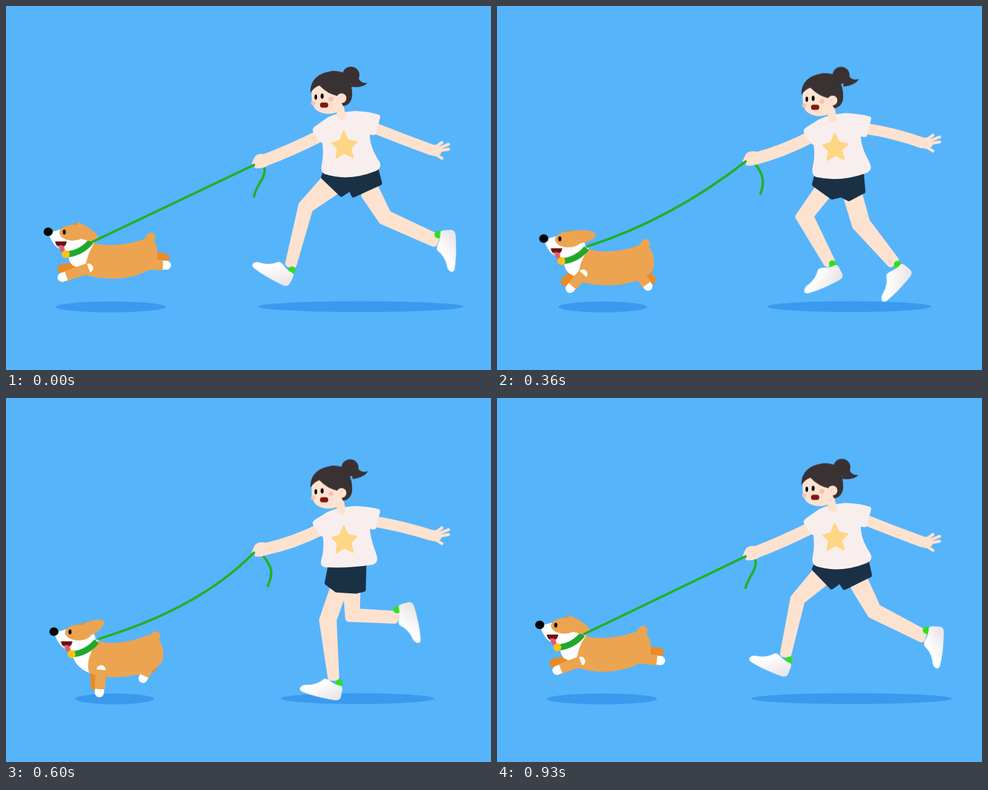
These frames come from a looping animation (800 px wide and 600 px high, 960 ms). An HTML page without scripts:

```html
<!DOCTYPE html>
<html lang="en">
<head>
<meta charset="utf-8">
<title>Dog run</title>
<style>
html, body { margin: 0; width: 100%; height: 100%; overflow: hidden; background: #56b4fb; }
svg { display: block; width: 100vw; height: 100vh; }
svg * { animation: 960ms linear infinite; }
.skin { fill: #fee2d0; }
.limb { fill: none; stroke: #fee2d0; }
.leg { fill: #fee2d0; stroke: #fee2d0; stroke-width: 12; stroke-linejoin: round; }
.hair { fill: #3a3133; }
.coat { fill: #eda450; }
.rope { fill: none; stroke: #22b024; stroke-width: 4; stroke-linecap: round; }
.dark { fill: none; stroke: #e88b28; stroke-width: 15; stroke-linecap: round; }
.paw { fill: none; stroke: #fff; stroke-width: 15; stroke-linecap: round; }
.fur { fill: none; stroke: #eda450; stroke-width: 17; stroke-dasharray: 84 100; }

/* The resting pose opens and closes every loop; keyframes hold the poses between. */
.dog-shade { animation-name: dog-shade; }
@keyframes dog-shade {
  12.5% { cx: 178px; rx: 70px; }
  25% { cx: 176px; rx: 48px; }
  46.88%, 48.4%, 96.88% { cx: 173px; rx: 91px; }
  62.5% { cx: 179px; rx: 65px; }
  75% { cx: 176px; rx: 54px; }
}
.girl-shade { animation-name: girl-shade; }
@keyframes girl-shade {
  12.5% { cx: 580.5px; rx: 131.5px; }
  25% { cx: 576px; rx: 94px; }
  46.88%, 96.88% { cx: 585px; rx: 165px; }
  48.4%, 98.4% { cx: 585.5px; rx: 169.5px; }
  62.5% { cx: 580px; rx: 127px; }
  73.4% { cx: 576px; rx: 94px; }
}

.head { animation-name: head; }
@keyframes head {
  12.5% { transform: translate(8.5px, 11.5px); }
  25% { transform: translate(16.5px, 24px); }
  46.88%, 48.4%, 96.88% { transform: translate(1px, 2px); }
  62.5% { transform: translate(9.5px, 13px); }
  75% { transform: translate(15.5px, 22px); }
}
.flap { transform: translate(122px, 370px) rotate(30deg); animation-name: flap; }
@keyframes flap {
  12.5% { transform: translate(122px, 370px) rotate(-20deg); }
  25% { transform: translate(122px, 370px) rotate(-48deg); }
  46.88%, 48.4%, 96.88% { transform: translate(122px, 370px) rotate(28deg); }
  62.5% { transform: translate(122px, 370px) rotate(-23deg); }
  75% { transform: translate(122px, 370px) rotate(-45deg); }
}
.back-flap { transform: translate(118px, 370px) rotate(24deg); animation-name: back-flap; }
@keyframes back-flap {
  12.5%, 62.5% { transform: translate(116px, 370px) rotate(-18deg); }
  25%, 75% { transform: translate(113px, 370px) rotate(-44deg); }
  46.88%, 96.88% { transform: translate(118px, 370px) rotate(24deg); }
}
.wag { animation-name: wag; }
@keyframes wag {
  12.5%, 62.5% { transform: translate(8px, 11px); }
  25% { transform: translate(11.5px, 23px); }
  46.88%, 48.4%, 96.88% { transform: translate(2px, 2px); }
  75% { transform: translate(11px, 23px); }
}
.trunk { animation-name: trunk; }
@keyframes trunk {
  12.5%, 62.5% { d: path("M152 400C170 408 210 402 236 390C255 392 263 415 258 432C250 452 215 458 185 460C165 461 150 458 137 453C132 435 140 415 152 400Z"); }
  25%, 75% { d: path("M158 412C180 420 220 418 245 404C265 410 270 435 263 450C250 468 215 475 185 473C165 472 150 470 138 466C138 445 145 425 158 412Z"); }
  46.88%, 48.4%, 96.88% { d: path("M147 392C162 398 202 397 235 383C252 385 256 405 253 425C240 440 202 453 167 451C143 449 134 444 127 445C133 431 132 410 147 392Z"); }
}
.chest { animation-name: chest; }
@keyframes chest {
  12.5%, 62.5% { d: path("M152 398L109 424Q116 446 140 454Z"); }
  25%, 75% { d: path("M157 408L119 432Q118 452 140 466Z"); }
  46.88%, 48.4%, 96.88% { d: path("M147 390L104 411Q104 436 132 433Z"); }
}
.fore { animation-name: fore; }
@keyframes fore {
  12.5% { d: path("M158 448L155 485"); }
  25% { d: path("M147 452L150 488"); }
  46.88%, 48.4%, 96.88% { d: path("M138 434L99 449"); }
  62.5% { d: path("M157 448L154 486"); }
  75% { d: path("M145 452L147 485"); }
}
.far-fore { animation-name: far-fore; }
@keyframes far-fore {
  12.5%, 62.5% { d: path("M147 450L147 474"); }
  25% { d: path("M131 455L138 478"); }
  46.88%, 48.4%, 96.88% { d: path("M124 431L94 437"); }
  75% { d: path("M130 455L136 474"); }
}
.hind { animation-name: hind; }
@keyframes hind {
  12.5% { d: path("M240 430L229 459"); }
  25% { d: path("M243 462L226 497"); }
  46.88%, 48.4% { d: path("M230 430L266 436"); }
  62.5% { d: path("M238 435L226 462"); }
  75% { d: path("M243 460L228 494"); }
  96.88% { d: path("M232 429L270 433"); }
}
.far-hind { animation-name: far-hind; }
@keyframes far-hind {
  12.5%, 62.5% { d: path("M240 430L240 445"); }
  25% { d: path("M246 460L239 490"); }
  46.88%, 48.4% { d: path("M240 421L266 423"); }
  75% { d: path("M244 460L240 486"); }
  96.88% { d: path("M240 416L268 419"); }
}

.leash { animation-name: leash; }
@keyframes leash {
  12.5% { d: path("M153 397Q322 343 409 256"); }
  25% { d: path("M157 406Q302 388 410 250"); }
  46.88%, 48.4%, 96.88% { d: path("M144 389Q277 325 410 261"); }
  62.5% { d: path("M153 397Q320 346 409 255"); }
  75% { d: path("M157 405Q302 386 410 252"); }
}
.loose { animation-name: loose; }
@keyframes loose {
  12.5% { d: path("M426 262C433 285 422 285 417 312"); }
  25% { d: path("M425 259C436 277 434 290 426 311"); }
  46.88%, 48.4% { d: path("M428 264C444 280 446 295 441 308"); }
  62.5% { d: path("M425 261C441 282 440 290 432 310"); }
  75% { d: path("M425 260C436 278 432 290 424 311"); }
  96.88% { d: path("M426 264C430 285 416 290 410 313"); }
}

.bob { animation-name: bob; }
@keyframes bob {
  12.5%, 62.5% { transform: translateY(4.5px); }
  25% { transform: translateY(8px); }
  46.88%, 48.4%, 96.88% { transform: translateY(.5px); }
  75% { transform: translateY(7.8px); }
}
.pony { transform-origin: 555px 118px; animation-name: pony; }
@keyframes pony {
  12.5%, 62.5% { transform: rotate(-15deg); }
  25% { transform: rotate(-33deg); }
  46.88%, 48.4%, 96.88% { transform: rotate(-1deg); }
  75% { transform: rotate(-31deg); }
}
.shirt { animation-name: shirt; }
@keyframes shirt {
  12.5% { d: path("M530 188Q547 180 575 177Q600 178 614 182Q618 183 617 187L610 215Q609 218 600 216Q602 232 613 255Q622 274 606 278Q565 285 526 281Q516 278 521 263Q525 248 523 229Q517 228 506 208Q505 204 509 201Z"); }
  25% { d: path("M530 192Q547 183 575 181Q600 182 614 186Q618 187 617 191L610 219Q609 222 600 219Q602 236 612 258Q622 276 606 281Q565 292 528 289Q517 286 521 270Q526 252 523 233Q517 231 506 210Q505 206 509 203Z"); }
  46.88%, 48.4%, 96.88% { d: path("M530 184Q547 175 575 173Q600 174 614 179Q618 180 617 184L610 211Q609 214 600 212Q600 232 615 255Q622 266 610 272Q565 290 526 277Q518 274 521 260Q524 245 522 226Q517 225 506 206Q505 202 509 199Z"); }
  62.5% { d: path("M530 188Q547 180 575 178Q600 179 614 183Q618 184 617 188L610 215Q609 218 600 216Q602 234 610 255Q617 273 603 275Q565 281 526 279Q516 277 521 263Q525 248 523 229Q517 228 506 208Q505 204 509 201Z"); }
  75% { d: path("M530 192Q547 183 575 181Q600 182 614 186Q618 187 617 191L610 219Q609 222 600 219Q602 240 608 260Q613 277 599 277Q560 278 526 283Q516 281 521 268Q525 252 523 233Q517 231 506 210Q505 206 509 203Z"); }
}
.shorts { animation-name: shorts; }
@keyframes shorts {
  12.5% { d: path("M538 278L533 300L574 319L579 311L583 311L598 307L597 272Z"); }
  25% { d: path("M535 283L531 301L550 318L570 320L588 320L595 319L596 275Z"); }
  46.88%, 48.4% { d: path("M523 270L517 289L555 314L566 306L575 317L611 296L605 268Z"); }
  62.5% { d: path("M535 275L529 305L545 317L560 318L577 319L590 316L591 270Z"); }
  75% { d: path("M530 278L522 299L549 322L560 324L574 326L588 325L594 268Z"); }
  96.88% { d: path("M529 268L523 282L552 312L566 302L573 313L615 292L609 265Z"); }
}
.front-arm { animation-name: front-arm; }
@keyframes front-arm {
  12.5%, 62.5% { d: path("M520 216Q475 239 424 250"); }
  25%, 75% { d: path("M520 217Q476 242 424 248"); }
  46.88%, 48.4%, 96.88% { d: path("M520 213Q470 238 425 255"); }
}
.fist { animation-name: fist; }
@keyframes fist {
  12.5% { transform: translateY(-5px); }
  25%, 75% { transform: translateY(-9px); }
  46.88%, 48.4% { transform: translateY(-1px); }
  62.5% { transform: translateY(-6px); }
  96.88% { transform: none; }
}
.back-arm { animation-name: back-arm; }
@keyframes back-arm {
  12.5% { d: path("M605 203Q655 213 704 232"); }
  25%, 75% { d: path("M605 205Q655 212 704 230"); }
  46.88%, 48.4% { d: path("M605 199Q655 206 704 224"); }
  62.5% { d: path("M605 203Q655 211 704 227"); }
  96.88% { d: path("M605 200Q655 220 704 238"); }
}
.palm { animation-name: palm; }
@keyframes palm {
  12.5% { transform: translateY(-4px); }
  25%, 75% { transform: translateY(-8px); }
  46.88%, 48.4% { transform: translateY(-15px); }
  62.5% { transform: translateY(-11px); }
  96.88% { transform: none; }
}

.leg-a { animation-name: leg-a; }
@keyframes leg-a {
  12.5% { d: path("M540 300L519 353L522 455L531 456L535 357L560 315Z"); }
  25% { d: path("M558 315L560 380L588 460L595 461L578 375L581 315Z"); }
  35.94% { d: path("M575 315L588 365L643 433L651 427L606 358L594 308Z"); }
  46.88%, 48.4% { d: path("M590 315L612 350L684 378L687 370L626 340L606 300Z"); }
  62.5% { d: path("M562 315L566 363L641 366L644 357L578 353L579 315Z"); }
  75% { d: path("M530 308L515 362L597 372L598 365L534 350L544 318Z"); }
  85.94% { d: path("M533 300L500 350L557 425L564 420L519 348L545 312Z"); }
  96.88% { d: path("M527 285L490 330L473 421L480 422L502 334L541 303Z"); }
}
.leg-b { animation-name: leg-b; }
@keyframes leg-b {
  12.5% { d: path("M568 312L573 366L655 384L658 375L589 356L588 305Z"); }
  25% { d: path("M542 310L522 369L607 385L609 376L540 361L548 318Z"); }
  35.94% { d: path("M533 300L500 350L557 425L564 420L519 348L545 312Z"); }
  46.88%, 48.4% { d: path("M524 290L487 333L475 420L482 422L501 337L541 308Z"); }
  62.5% { d: path("M543 305L522 366L536 460L543 460L539 366L556 318Z"); }
  75% { d: path("M559 320L560 379L604 462L611 459L578 374L580 320Z"); }
  85.94% { d: path("M575 315L588 365L643 433L651 427L606 358L594 308Z"); }
  96.88% { d: path("M590 313L617 357L700 397L703 387L627 346L606 300Z"); }
}
.foot-a { transform: translate(471px, 435px) rotate(27deg); animation-name: foot-a; }
@keyframes foot-a {
  12.5% { transform: translate(535px, 463px) rotate(20deg); }
  25% { transform: translate(602px, 467px) rotate(0deg); }
  35.94% { transform: translate(655px, 437px) rotate(-42deg); }
  46.88%, 48.4% { transform: translate(691px, 364px) rotate(-92deg); }
  62.5% { transform: translate(645px, 349px) rotate(-105deg); }
  75% { transform: translate(603px, 357px) rotate(-88deg); }
  85.94% { transform: translate(566px, 424px) rotate(-35deg); }
  96.88% { transform: translate(482px, 432px) rotate(21deg); }
}
.foot-b { transform: translate(713px, 377px) rotate(-92deg); animation-name: foot-b; }
@keyframes foot-b {
  12.5% { transform: translate(662px, 369px) rotate(-96deg); }
  25% { transform: translate(615px, 370px) rotate(-88deg); }
  35.94% { transform: translate(566px, 424px) rotate(-35deg); }
  46.88%, 48.4% { transform: translate(483px, 431px) rotate(20deg); }
  62.5% { transform: translate(549px, 470px) rotate(11deg); }
  75% { transform: translate(621px, 465px) rotate(-8deg); }
  85.94% { transform: translate(655px, 437px) rotate(-42deg); }
  96.88% { transform: translate(708px, 383px) rotate(-87deg); }
}
</style>
</head>
<body>
<svg viewBox="0 0 800 600">
  <defs>
    <linearGradient id="canvas" x2="1" y2=".6">
      <stop offset=".45" stop-color="#fff"/>
      <stop offset="1" stop-color="#ebe7e8"/>
    </linearGradient>
    <g id="shoe">
      <ellipse cy="1" rx="6" ry="7" fill="#2fe01c"/>
      <path fill="url(#canvas)" d="M-62 20Q-60 13 -48 12Q-34 8 -26 -2Q-20 -4 -14 0Q-6 4 4 4Q7 5 7 12L7 22Q6 29 -2 29Q-30 30 -54 26Q-63 25 -62 20Z"/>
    </g>
    <path id="ear" d="M-10 -10Q18 -14 32 -5Q36 0 28 5Q12 13 -6 10Z"/>
  </defs>

  <g fill="#3a9aee">
    <ellipse class="dog-shade" cx="173" cy="496" rx="91" ry="9"/>
    <ellipse class="girl-shade" cx="585.5" cy="495.500" rx="169.5" ry="9"/>
  </g>

  <g>
    <path class="dark far-hind" d="M235 411L262 415"/>
    <path class="dark far-fore" d="M122 428L92 433"/>
    <path class="wag" d="M230 394L239 381" stroke="#eda450" stroke-width="15" stroke-linecap="round"/>
    <path class="paw hind" d="M228 426L265 427"/>
    <path class="fur hind" pathLength="100" d="M228 426L265 427"/>
    <path class="chest" fill="#fff" d="M146 388L103 410Q103 434 130 431Z"/>
    <path class="coat trunk" d="M146 391C160 396 200 396 233 382C250 382 252 405 248 425C235 440 200 452 165 449C140 447 130 442 124 443C133 430 132 410 146 391Z"/>
    <path class="paw fore" d="M136 432L92 447"/>
    <path class="fur fore" pathLength="100" d="M136 432L92 447"/>
    <g class="head">
      <use class="back-flap" href="#ear" fill="#e88b28"/>
      <path fill="#fff" d="M70 374Q75 390 83 397Q94 405 110 404L138 388Q140 370 115 364L90 368Z"/>
      <path fill="none" stroke="#20a82a" stroke-width="10" d="M103 409Q125 406 140 388"/>
      <ellipse class="coat" cx="110" cy="373.500" rx="22" ry="13"/>
      <use class="coat flap" href="#ear"/>
      <ellipse cx="69.5" cy="372" rx="7.500" ry="7"/>
      <ellipse cx="96" cy="372.500" rx="2.500" ry="4"/>
      <path fill="#6e0f12" d="M81 388H100Q99 398 90 397Q82 397 81 388Z"/>
      <path fill="#e35d6c" d="M86 395Q92 392 96 397L97 403Q94 408 90 404Z"/>
      <circle cx="98.500" cy="409" r="6.500" fill="#ffc20e"/>
    </g>
  </g>

  <g>
    <path class="rope loose" d="M426 264C430 285 414 290 409 314"/>
    <path class="leg leg-b" d="M592 312L621 354L706 391L710 381L630 343L608 298Z"/>
    <g class="foot-b"><use href="#shoe"/></g>
    <path class="leg leg-a" d="M526 285L488 328L466 424L473 426L500 334L548 302Z"/>
    <g class="foot-a"><use href="#shoe"/></g>
    <path class="shorts" fill="#1a3145" stroke="#1a3145" stroke-width="7" stroke-linejoin="round" d="M529 268L523 282L553 311L568 301L573 312L617 292L610 265Z"/>
    <path class="limb front-arm" stroke-width="20" d="M520 213Q470 238 425 255"/>
    <path class="skin fist" d="M430 245Q414 241 409 251L405 261Q407 264 411 261L410 267Q421 269 431 264Z"/>
    <path class="limb back-arm" stroke-width="18" d="M605 200Q655 220 704 238"/>
    <g class="palm">
      <ellipse class="skin" cx="708" cy="238" rx="11" ry="9.500"/>
      <path class="limb" stroke-width="5" stroke-linecap="round" d="M708 233L719 225M712 235L730 228M712 239L730 236M708 244L719 251"/>
    </g>
    <path class="shirt" fill="#f9eeee" d="M530 184Q547 175 575 173Q600 174 614 179Q618 180 617 184L610 211Q609 214 600 212Q600 232 615 255Q622 266 610 272Q565 290 526 277Q518 274 521 260Q524 245 522 226Q517 225 506 206Q505 202 509 199Z"/>
    <g class="bob">
      <path fill="#ffd684" stroke="#ffd684" stroke-width="3" stroke-linejoin="round" d="M557 207L563.500 221L578 224L568 234L572 249L558 242L545 250L547.500 234.500L538 226L551 222Z"/>
      <path class="skin" d="M545 165L546 182Q553 194 561 183L556 160Z"/>
      <path class="skin" d="M505 136Q501 165 514 173Q530 182 549 174L560 140L530 120Z"/>
      <g class="hair">
        <g class="pony">
          <circle cx="569" cy="114" r="14"/>
          <path d="M575 104Q583 112 582 120Q586 128 596 127Q588 136 568 133Z"/>
        </g>
        <path d="M502 142Q502 112 538 107Q554 106 562 114Q572 130 571 148Q569 163 556 165L549 149Q530 145 517 131Q508 134 503 142Z"/>
      </g>
      <circle class="skin" cx="553.500" cy="152" r="8"/>
      <path fill="none" stroke="#f6c3a8" d="M551 154Q551 149 556 148"/>
      <g fill="#f9bfb2">
        <circle cx="536" cy="153.500" r="4"/>
        <circle cx="506.500" cy="160" r="3.500"/>
      </g>
      <ellipse cx="511" cy="150" rx="2.200" ry="4.200"/>
      <ellipse cx="521.500" cy="148.500" rx="2.400" ry="4.200"/>
      <rect x="518" y="159" width="13.500" height="8.500" rx="4" fill="#84170f"/>
    </g>
    <path class="rope leash" d="M142 389Q275.500 325.500 409 262"/>
  </g>
</svg>
</body>
</html>
```
